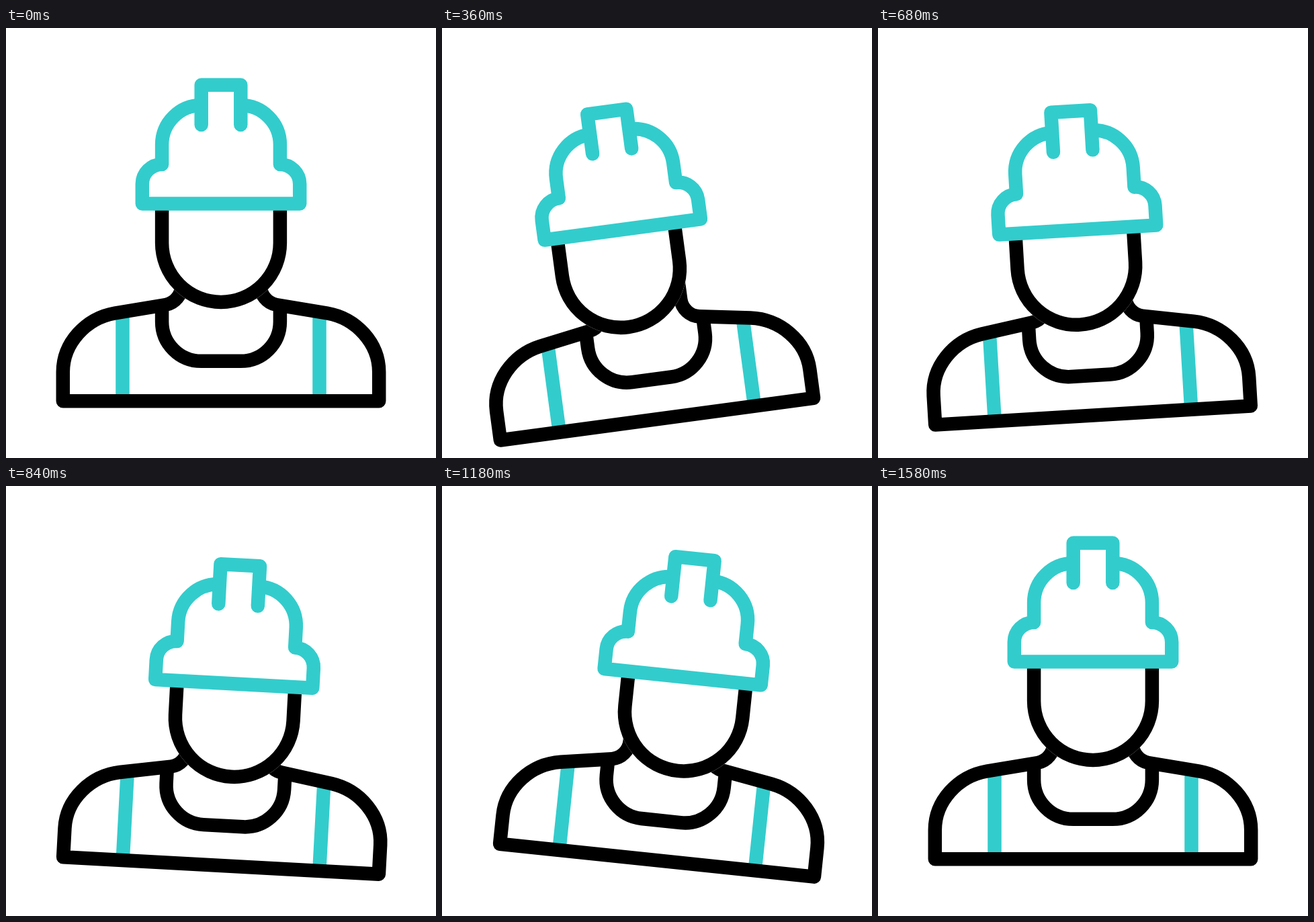
Write an HTML page with a canvas that moves like this. It is 640 px wide and 640 px high and loops after 2400 ms.

```html
<!DOCTYPE html>
<html lang="en">
<head>
<meta charset="utf-8">
<title>Worker</title>
<style>
  html, body { margin: 0; width: 100%; height: 100%; overflow: hidden; background: #fff; }
  canvas { display: block; }
</style>
</head>
<body>
<canvas id="stage" width="640" height="640"></canvas>
<script>
const ctx = document.getElementById('stage').getContext('2d');
const LOOP = 2400, STEP = 20, STROKE = 20.5;
const BLACK = '#000', TEAL = '#33cccc', WHITE = '#fff';
const PIVOT = { x: 320, y: 555.2 };

// Key times of the sway: upright, tilted left, tilted right, upright.
const TIMES = [0, 460, 1032, 1580];

// One value per key; sag bows the path between two keys.
const TRACKS = {
  angle:   { keys: [0, -8.7, 7.28, 0] },
  drop:    { keys: [0, 30.7, 2.4, 0] },
  faceX:   { keys: [0, -26.9, 20.3, 0] },
  faceY:   { keys: [0, 6.6, 14.6, 0], sag: [0, 2.5, -0.7] },
  helmetX: { keys: [0, -15, 11.6, 0] },
  helmetY: { keys: [0, 8, 23, 0], sag: [0, 4.2, -1.3] }
};

const torso = new Path2D(`
  M378.6 340 V383 C378.6 397 388.5 409.5 402.5 412 L478 424.5
  C521 432 555.2 469 555.2 512 V555.2 H84.8 V512
  C84.8 469 119 432 162 424.5 L237.5 412
  C251.5 409.5 261.4 397 261.4 383 V340`);
const collar = new Path2D(
  'M232.1 414 V437.2 A58.6 58.6 0 0 0 290.7 495.8 H349.3 A58.6 58.6 0 0 0 407.9 437.2 V414');
const straps = new Path2D('M173.5 426 V552 M466.5 426 V552');
const face = new Path2D('M232.1 262 V320 A87.9 87.9 0 0 0 407.9 320 V262');
const shell = new Path2D(`
  M290.7 115 A58.6 58.6 0 0 0 232.1 173.6 V202.9
  A29.3 29.3 0 0 0 202.8 232.2 V261.6 H437.2 V232.2
  A29.3 29.3 0 0 0 407.9 202.9 V173.6 A58.6 58.6 0 0 0 349.3 115`);
const ridge = new Path2D('M290.7 144 V84.7 H349.3 V144');

function poseAt(time) {
  const t = Math.min(time, TIMES[3]);
  const i = t < TIMES[1] ? 0 : t < TIMES[2] ? 1 : 2;
  const p = (t - TIMES[i]) / (TIMES[i + 1] - TIMES[i]);
  const f = p * p * (3 - 2 * p);
  const pose = {};
  for (const [name, { keys, sag }] of Object.entries(TRACKS)) {
    const bow = sag ? sag[i] * 4 * f * (1 - f) : 0;
    pose[name] = keys[i] + (keys[i + 1] - keys[i]) * f + bow;
  }
  return pose;
}

function line(path, color, cap = 'butt') {
  ctx.strokeStyle = color;
  ctx.lineCap = cap;
  ctx.stroke(path);
}

function fill(path) {
  ctx.fillStyle = WHITE;
  ctx.fill(path);
}

function shifted(x, y, paint) {
  ctx.save();
  ctx.translate(x, y);
  paint();
  ctx.restore();
}

function draw(time) {
  const pose = poseAt(time);
  ctx.fillStyle = WHITE;
  ctx.fillRect(0, 0, 640, 640);
  ctx.lineWidth = STROKE;
  ctx.lineJoin = 'round';

  ctx.save();
  ctx.translate(PIVOT.x, PIVOT.y + pose.drop);
  ctx.rotate(pose.angle * Math.PI / 180);
  ctx.translate(-PIVOT.x, -PIVOT.y);

  line(straps, TEAL);
  line(collar, BLACK);
  line(torso, BLACK);

  shifted(pose.faceX, pose.faceY, () => {
    fill(face);
    line(face, WHITE);
    line(face, BLACK);
  });

  shifted(pose.helmetX, pose.helmetY, () => {
    fill(shell);
    line(shell, TEAL);
    line(ridge, TEAL, 'round');
  });
  ctx.restore();
}

const start = performance.now();
function tick() {
  const time = (performance.now() - start) % LOOP;
  draw(Math.floor(time / STEP) * STEP);
  requestAnimationFrame(tick);
}
tick();
</script>
</body>
</html>
```
